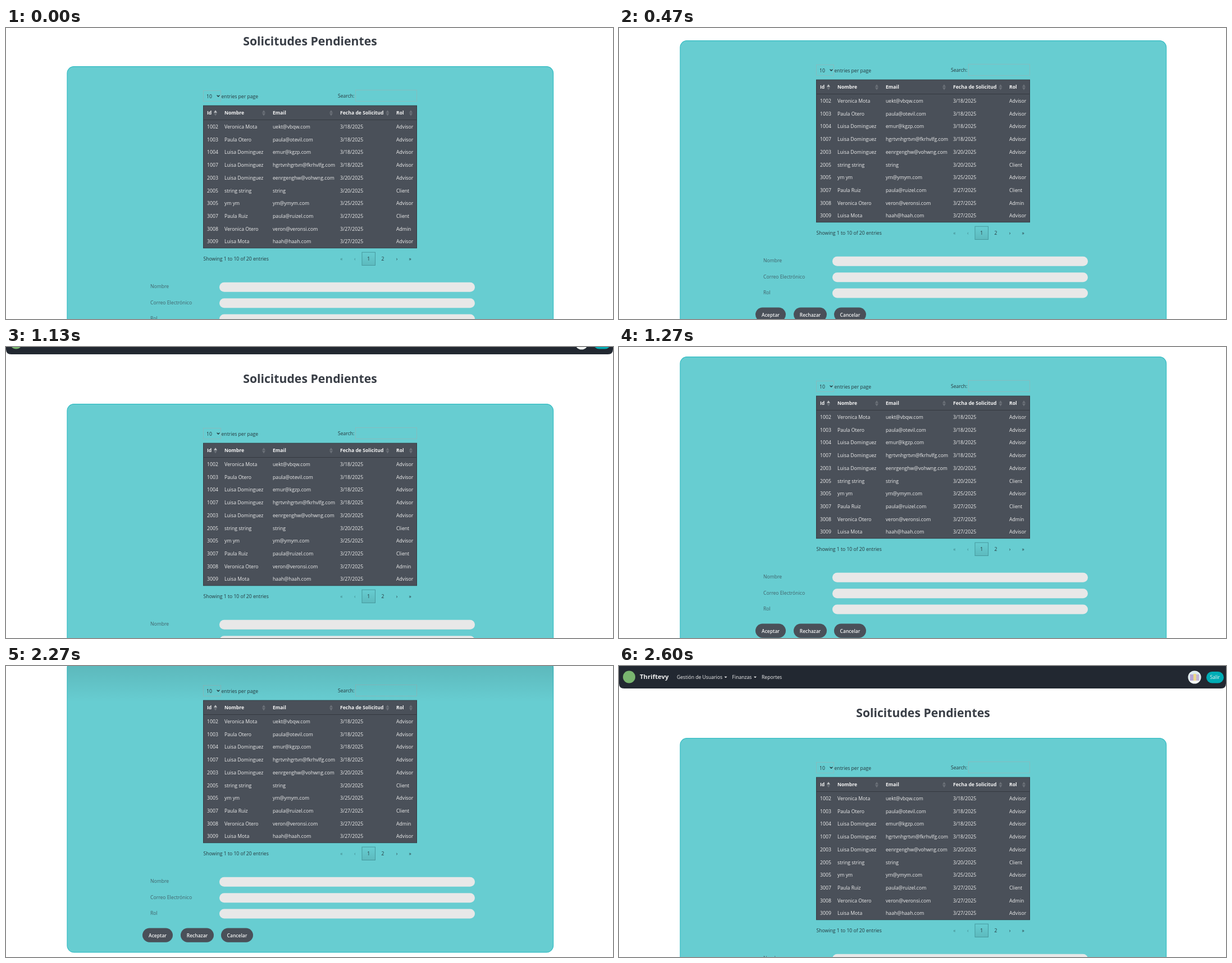
These frames come from a looping animation (1081x518 px, 4200 ms). An HTML page:

```html
<!DOCTYPE html>
<html lang="es">
<head>
<meta charset="utf-8">
<title>Solicitudes Pendientes</title>
<style>
  html, body { margin: 0; width: 100%; height: 100%; overflow: hidden; background: #fff; }
  svg { display: block; }
  text { font: 8.65px "Open Sans", "Noto Sans", sans-serif; fill: #26383e; white-space: pre; }
  .title { font-size: 21.2px; font-weight: 700; fill: #393e46; }
  .brand { font-size: 11.4px; font-weight: 700; fill: #eee; }
  .nav { fill: #f2f2f2; }
  .head { font-weight: 700; fill: #f4f4f4; }
  .cell { font-size: 8.7px; fill: #eee; }
  .label { fill: #40626a; }
  .button { font-size: 8.5px; font-weight: 600; fill: #f4f4f4; }
  .off { fill: #3f8085; }
  .mid { text-anchor: middle; }
</style>
</head>
<body>
<svg id="stage" width="1081" height="518" viewBox="0 0 1081 518">
  <defs>
    <linearGradient id="shadeFill" x2="0" y2="1">
      <stop offset="0" stop-color="#000" stop-opacity=".1"/>
      <stop offset="1" stop-color="#000" stop-opacity="0"/>
    </linearGradient>
    <linearGradient id="pageFill" x2="0" y2="1">
      <stop offset="0" stop-color="#67cdd1"/>
      <stop offset="1" stop-color="#5dbabe"/>
    </linearGradient>
    <clipPath id="avatarClip"><circle cx="1025" cy="20" r="10.6"/></clipPath>
  </defs>
  <g id="page"></g>
  <rect id="shade" x="109" width="866" height="64" fill="url(#shadeFill)"/>
</svg>
<script>
const page = document.getElementById('page');
const shade = document.getElementById('shade');

function add(tag, attrs, content) {
  const node = document.createElementNS('http://www.w3.org/2000/svg', tag);
  for (const key in attrs) node.setAttribute(key, attrs[key]);
  if (content) node.textContent = content;
  page.append(node);
}
const box = (x, y, width, height, fill, more) => add('rect', { x, y, width, height, fill, ...more });
const path = (d, fill, more) => add('path', { d, fill, ...more });
// y is the middle of the capitals
const label = (x, y, str, cls = '', drop = 3.2) => add('text', { x, y: y + drop, class: cls }, str);

function drawNav() {
  path('M0 0H1081V31Q1081 40 1072 40H9Q0 40 0 31Z', '#222831');
  add('circle', { cx: 18, cy: 19.5, r: 11, fill: '#79b56f' });
  label(37, 19, 'Thriftevy', 'brand', 4);
  label(103, 20, 'Gestión de Usuarios', 'nav');
  label(201.5, 20, 'Finanzas', 'nav');
  label(254, 20, 'Reportes', 'nav');
  for (const x of [187.5, 240]) path(`M${x} 18.7h5l-2.5 2.6z`, '#f2f2f2');

  add('circle', { cx: 1025, cy: 20, r: 11.6, fill: '#f3f8f8' });
  const clip = { 'clip-path': 'url(#avatarClip)' };
  box(1014, 9, 22, 22, '#dcebef', clip);
  box(1017, 15, 6, 11, '#b7a6d6', clip);
  box(1023, 14, 5, 12, '#ecd98c', clip);
  box(1028, 15, 5, 11, '#c3b4d6', clip);
  box(1014, 26, 22, 5, '#f4f6f4', clip);

  box(1046, 10, 31, 20.5, '#00adb5', { rx: 10.2 });
  label(1061.3, 20, 'Salir', 'nav mid');
}

function drawControls() {
  const line = { stroke: '#aaa', 'stroke-opacity': .55, 'stroke-width': .8 };
  box(351.5, 171.5, 31, 19, 'none', line);
  label(357, 181.5, '10');
  path('M375.6 179.6l2.4 2.4l2.4-2.4', 'none', { stroke: '#1d2b30', 'stroke-width': 1.3 });
  label(383.5, 181.5, 'entries per page');
  label(591, 181, 'Search:');
  box(622.5, 170.5, 109, 20, 'none', line);
}

function drawTable() {
  const cols = [358, 389, 475, 595, 695];
  const heads = ['Id', 'Nombre', 'Email', 'Fecha de Solicitud', 'Rol'];
  const rows = [
    '1002|Veronica Mota|uekt@vbqw.com|3/18/2025|Advisor',
    '1003|Paula Otero|paula@otevil.com|3/18/2025|Advisor',
    '1004|Luisa Dominguez|emur@kgzp.com|3/18/2025|Advisor',
    '1007|Luisa Dominguez|hgrtvnhgrtvn@fkrhvlfg.com|3/18/2025|Advisor',
    '2003|Luisa Dominguez|eenrgenghw@vohwng.com|3/20/2025|Advisor',
    '2005|string string|string|3/20/2025|Client',
    '3005|ym ym|ym@ymym.com|3/25/2025|Advisor',
    '3007|Paula Ruiz|paula@ruizel.com|3/27/2025|Client',
    '3008|Veronica Otero|veron@veronsi.com|3/27/2025|Admin',
    '3009|Luisa Mota|haah@haah.com|3/27/2025|Advisor'
  ];
  box(351.5, 198.2, 380, 253.5, '#4a5059', { stroke: '#343940' });
  box(352, 223, 379, 1, '#343940');
  heads.forEach((str, i) => label(cols[i], 211, str, 'head'));
  [373, 459, 579, 679.5, 721].forEach((x, i) => {
    path(`M${x - 3} 210.8l3-4.6l3 4.6z`, i ? '#6b7078' : '#bfc2c5');
    path(`M${x - 3} 211.8l3 4.6l3-4.6z`, '#6b7078');
  });
  rows.forEach((row, r) =>
    row.split('|').forEach((str, i) => label(cols[i], 235.7 + r * 22.73, str, 'cell')));
}

function drawPager() {
  label(351.5, 471, 'Showing 1 to 10 of 20 entries');
  box(634, 459.2, 23.5, 23.3, 'url(#pageFill)', { stroke: '#47999e' });
  label(597.5, 471, '«', 'off mid');
  label(621.3, 471, '‹', 'off mid');
  label(645.8, 471, '1', 'mid');
  label(671, 471, '2', 'mid');
  label(696, 471, '›', 'mid');
  label(719.7, 471, '»', 'mid');
}

function drawForm() {
  ['Nombre', 'Correo Electrónico', 'Rol'].forEach((str, i) => {
    const y = 512.7 + i * 28.45;
    label(257, y + 7.3, str, 'label');
    box(380, y, 455, 17, '#e8e8e8', { rx: 8.5 });
  });
  [['Aceptar', 243, 54], ['Rechazar', 311, 59], ['Cancelar', 383, 57]].forEach(([str, x, w]) => {
    box(x, 603.5, w, 25.2, '#4a5059', { rx: 12.6 });
    label(x + w / 2, 616.5, str, 'button mid');
  });
}

drawNav();
label(541.5, 83, 'Solicitudes Pendientes', 'title mid', 8);
box(109, 128.6, 865.6, 518, '#67cdd1', { rx: 12, stroke: '#35bcc3', 'stroke-width': 1.2 });
drawControls();
drawTable();
drawPager();
drawForm();

// [time in ms, scroll offset], held until the next entry
const LOOP = 4200;
const steps = [
  [0, 60], [70, 100], [130, 128], [200, 138],
  [470, 106], [530, 46], [600, 10], [670, 0],
  [1130, 27], [1200, 74], [1270, 111], [1330, 131], [1400, 138],
  [2270, 137], [2330, 122], [2400, 76], [2470, 32], [2530, 7], [2600, 0]
];

function render() {
  const time = performance.now() % LOOP;
  const [, scroll] = steps.findLast(([start]) => start <= time);
  page.setAttribute('transform', `translate(0 ${-scroll})`);
  shade.setAttribute('opacity', Math.min(1, Math.max(0, (scroll - 120) / 17)));
  requestAnimationFrame(render);
}
render();
</script>
</body>
</html>
```
